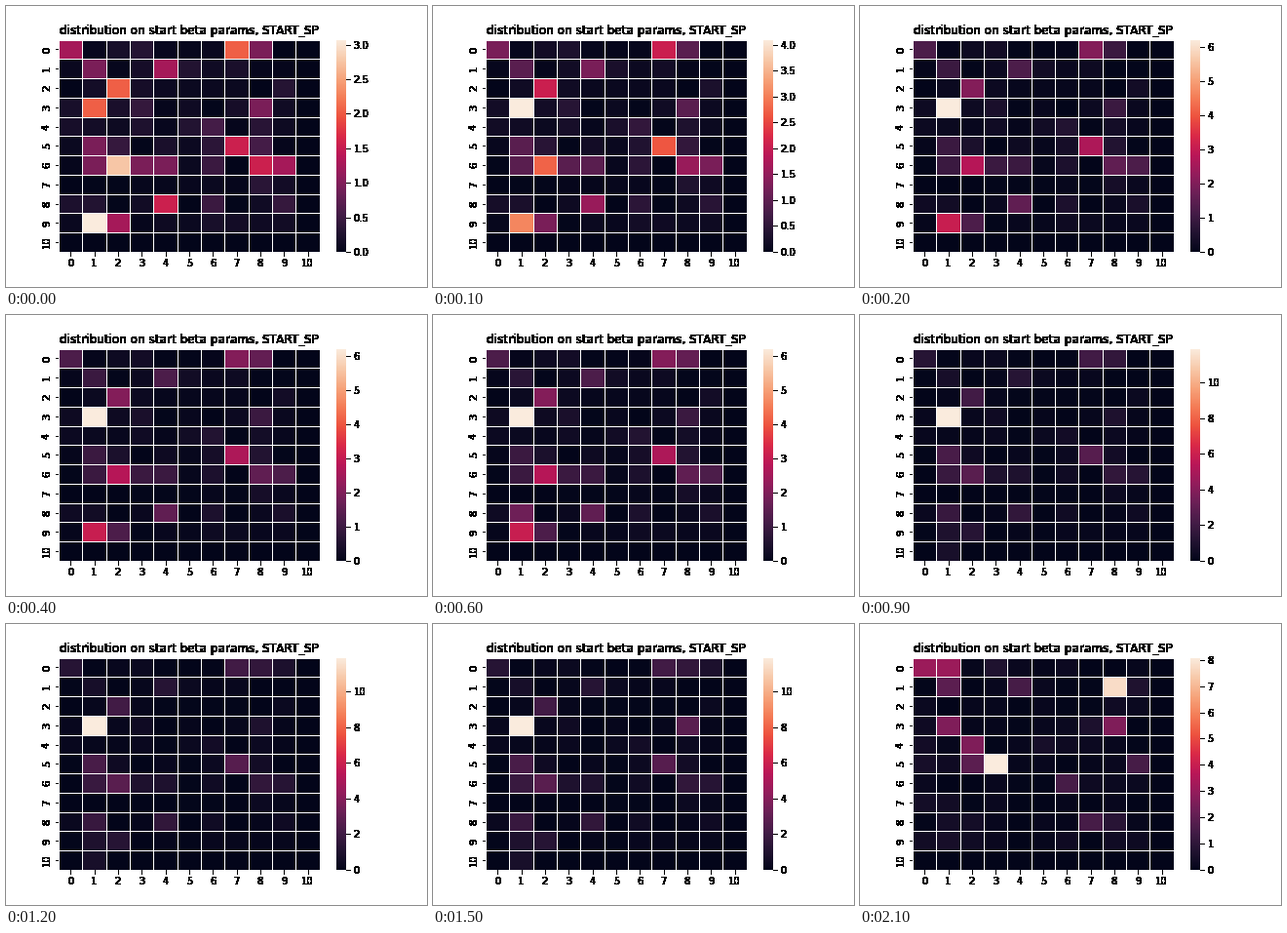
Recreate the animation shown at these times as a matplotlib script. Size 432x288 px, loop 2.3 s.

```python
import numpy as np
import matplotlib.pyplot as plt
from matplotlib.animation import FuncAnimation
from matplotlib.colors import LinearSegmentedColormap

N = 11
FRAMES, INTERVAL = 23, 100
RESET = 21  # tick at which a fresh grid replaces the first one

STOPS = ["#03051a", "#221331", "#451c47", "#6a1f56", "#921c5b", "#b91657",
         "#d92847", "#ed513e", "#f47c56", "#f6a47b", "#f7c9aa", "#faebdd"]
cmap = LinearSegmentedColormap.from_list("ember", STOPS)

# level -> (row, column) of the cells that stand out at that level
FIRST_PEAKS = {
    .95: [(0, 8), (1, 1), (3, 8), (5, 1), (6, 1), (6, 3), (6, 4)],
    1.25: [(0, 0), (1, 4), (6, 9), (9, 2)],
    1.55: [(5, 7), (6, 8), (8, 4)],
    2.05: [(0, 7), (2, 2), (3, 1)],
    2.77: [(6, 2)],
    3.0715: [(9, 1)],
}
SECOND_PEAKS = {
    1.5: [(1, 4), (5, 9), (6, 6), (8, 7)],
    1.9: [(1, 1), (5, 2)],
    2.6: [(3, 1), (3, 8), (4, 2)],
    3.1: [(0, 0), (0, 1)],
    7.75: [(1, 8)],
    8.081: [(5, 3)],
}

# (tick, cell, new value)
VISITS = [
    (1, (3, 1), 4.1), (1, (5, 7), 2.65), (2, (3, 1), 6.21),
    (4, (0, 8), 1.6), (5, (1, 1), .7), (6, (8, 1), 1.75),
    (7, (9, 1), .95), (7, (10, 1), .75),
    (8, (6, 1), 1.8), (8, (5, 1), 2.25), (9, (3, 1), 11.88),
    (12, (0, 9), .9), (15, (3, 8), 2.75),
]


def make_grid(peaks, haze, seed):
    """Faint random haze, empty in the last row and column, plus peaks."""
    rng = np.random.default_rng(seed)
    grid = np.zeros((N, N))
    grid[:-1, :-1] = rng.exponential(haze, (N - 1, N - 1)).clip(0, 4 * haze)
    for level, cells in peaks.items():
        for cell in cells:
            grid[cell] = level
    return grid


FIRST = make_grid(FIRST_PEAKS, .14, seed=3)
SECOND = make_grid(SECOND_PEAKS, .22, seed=8)


def grid_at(tick):
    if tick >= RESET:
        return SECOND
    grid = FIRST.copy()
    for start, cell, value in VISITS:
        if start <= tick:
            grid[cell] = value
    return grid


def solid(img, dpi):
    """Make every touched pixel fully opaque."""
    img = img.copy()
    img[..., 3] = img[..., 3] > 0
    return img, 0, 0


plt.rcParams.update({
    "font.family": "DejaVu Sans",
    "figure.subplot.left": .125, "figure.subplot.right": .9,
    "figure.subplot.bottom": .125, "figure.subplot.top": .88,
})
fig, ax = plt.subplots(figsize=(6, 4), dpi=72)

mesh = ax.pcolormesh(FIRST, cmap=cmap, vmin=0, vmax=FIRST.max(),
                     edgecolors="white", linewidth=1)
ax.set(xlim=(0, N), ylim=(N, 0))
ax.set_axisbelow(True)
ax.set_xticks(np.arange(N) + .5, range(N))
ax.set_yticks(np.arange(N) + .5, range(N), rotation=90, va="center")
ax.spines[:].set_visible(False)
ax.set_title("distribution on start beta params, START_SP")

bar = fig.colorbar(mesh, ax=ax)
bar.outline.set_linewidth(0)

for artist in (ax.title, ax.xaxis, ax.yaxis, bar.ax.yaxis):
    artist.set_agg_filter(solid)


def update(tick):
    grid = grid_at(tick)
    mesh.set_array(grid)
    mesh.set_clim(0, grid.max())
    return mesh,


anim = FuncAnimation(fig, update, frames=FRAMES, interval=INTERVAL,
                     repeat=True, repeat_delay=0, blit=False)
plt.show()
```
